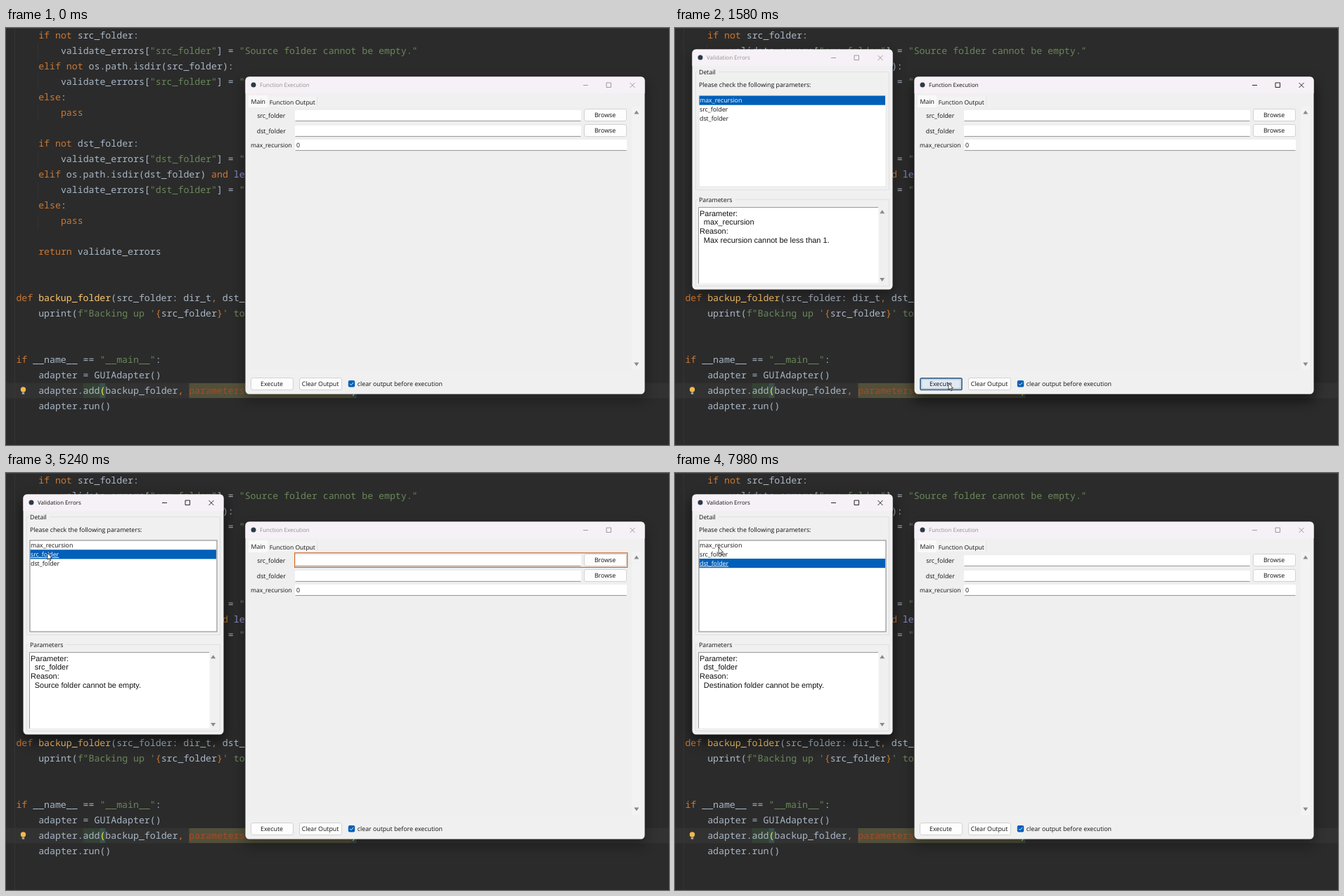
An HTML page that plays this animation: 943 by 594 pixels, repeating every 8000 ms.

```html
<!DOCTYPE html>
<html lang="en">
<head>
<meta charset="utf-8">
<title>Parameter validation</title>
<style>
  html, body { margin: 0; width: 100%; height: 100%; overflow: hidden; background: #2b2b2b; }
  svg { display: block; width: 943px; height: 594px; }
  text { white-space: pre; text-rendering: geometricPrecision; }
  .code { font: 13.23px "Noto Sans Mono", monospace; fill: #a9b7c6; }
  .kw { fill: #cc7832; }
  .str { fill: #6a8759; }
  .fn { fill: #ffc66d; }
  .arg { fill: #aa4926; }
  .builtin { fill: #8888c6; }
  .brace { fill: #ffef28; }
  .ui { font: 8.8px "Open Sans", "Noto Sans", sans-serif; fill: #111; }
  .cap { font: 8px "Open Sans", "Noto Sans", sans-serif; }
  .out { font: 10.95px "Liberation Sans", Arial, sans-serif; fill: #111; }
  .small { font-size: 8.55px; }
  .shadow { fill: #000; filter: blur(9px); opacity: .55; }
  .bar { fill: #111; color: #111; }
  .idle .bar { fill: #929292; color: #929292; }
  .idle .shadow { opacity: .3; }
</style>
</head>
<body>
<svg id="stage" viewBox="0 0 943 594" xmlns="http://www.w3.org/2000/svg"></svg>
<script>
const LOOP = 8000, CHAR = 7.94, ROW = 22, ITEM = 12.75;

const rect = (x, y, w, h, fill, more = '') =>
  `<rect x="${x}" y="${y}" width="${w}" height="${h}" fill="${fill}" ${more}/>`;
const label = (x, y, s, cls = 'ui', more = '') =>
  `<text x="${x}" y="${y}" class="${cls}" ${more}>${s}</text>`;
const line = (d, color, w = 1) =>
  `<path d="${d}" fill="none" stroke="${color}" stroke-width="${w}"/>`;
const mid = 'text-anchor="middle"';

// Editor: [row, column, text]
const code = [
  [0, 4, 'if not src_folder:'],
  [1, 8, 'validate_errors["src_folder"] = "Source folder cannot be empty."'],
  [2, 4, 'elif not os.path.isdir(src_folder):'],
  [3, 8, 'validate_errors["src_folder"] = "'],
  [4, 4, 'else:'],
  [5, 8, 'pass'],
  [7, 4, 'if not dst_folder:'],
  [8, 8, 'validate_errors["dst_folder"] = "'],
  [9, 4, 'elif os.path.isdir(dst_folder) and le'],
  [10, 8, 'validate_errors["dst_folder"] = "'],
  [11, 4, 'else:'],
  [12, 8, 'pass'],
  [14, 4, 'return validate_errors'],
  [17, 0, 'def backup_folder(src_folder: dir_t, dst_'],
  [18, 4, 'uprint(f"Backing up \'{src_folder}\' to'],
  [21, 0, 'if __name__ == "__main__":'],
  [22, 4, 'adapter = GUIAdapter()'],
  [23, 4, 'adapter.add(backup_folder, parameters'],
  [24, 4, 'adapter.run()']
];
const token = new RegExp([
  '(?<str>f?"[^"{]*"?|\' to)',
  '(?<kw>\\b(?:if|not|elif|else|pass|and|return|def)\\b|[,{}])',
  '(?<fn>(?<=def )\\w+)',
  '(?<arg>\\bparameters\\b)',
  '(?<builtin>\\ble$)',
  '(?<brace>(?<=add)\\()'
].join('|'), 'g');

function paint(s) {
  return s.replace(token, (m, ...rest) => {
    const groups = rest[rest.length - 1];
    const cls = Object.keys(groups).find(k => groups[k] !== undefined);
    return `<tspan class="${cls}">${m}</tspan>`;
  });
}

function editor() {
  let s = rect(0, 0, 943, 594, '#2b2b2b') + rect(0, 0, 943, 1, '#3a3a3a') +
    rect(0, 505.5, 943, 22, '#323232') + rect(12, 0, 1, 594, '#353535') +
    rect(109.5, 506, 24, 21, '#344134') + rect(133.4, 506, 8, 21, '#3b514d') +
    rect(260.5, 506, 231, 21, '#52503a') + rect(491, 506, 7.5, 21, '#3b514d') +
    label(490.6, 521.5, ')', 'code brace');
  for (const [row, col, text] of code) {
    if (col === 8) s += rect(45, row * ROW, 1, ROW, '#333');
    s += label((14.4 + col * CHAR).toFixed(2), 15.4 + row * ROW, paint(text), 'code');
  }
  return s + '<circle cx="24.5" cy="515" r="3.7" fill="#f2b84b"/>' +
    rect(22.8, 519.3, 3.4, 2.2, '#b9b9b9');
}

function frame(x, y, w, h, title) {
  const r = x + w, cy = y + 11;
  return `<rect class="shadow" x="${x - 2}" y="${y + 7}" width="${w + 4}" height="${h + 3}" rx="8"/>` +
    rect(x - .5, y - .5, w + 1, h + 1, '#f0f0f0', 'rx="5.5"') +
    `<path d="M${x - .5} ${y + 23}V${y + 5}q0-5.5 5.5-5.5H${r - 5}q5.5 0 5.5 5.5V${y + 23}z" fill="#f6f1f6"/>` +
    `<circle cx="${x + 11}" cy="${cy}" r="3.5" fill="#2c3a48"/>` +
    `<g class="bar">${label(x + 20, y + 14, title, 'cap')}` +
    line(`M${r - 87} ${cy + .5}h7M${r - 54} ${cy - 3}h6.5v6.5h-6.5zM${r - 20.5} ${cy - 3}l7 7m0-7l-7 7`, 'currentColor', .9) +
    '</g>';
}

const arrows = (x, y1, y2) =>
  `<path d="M${x - 3.5} ${y1 + 5}l3.5-5 3.5 5zM${x - 3.5} ${y2 - 5}l3.5 5 3.5-5z" fill="#8a8a8a"/>`;
const entry = (y, w) => rect(411, y, w, 16, '#fff', 'rx="1.5"') +
  line(`M411.5 ${y + 15.4}h${w - 1}`, '#868686', .9);
const button = (x, y, h, s) =>
  rect(x + .5, y + .5, 60, h, '#fdfdfd', 'rx="2.5" stroke="#d3d3d3"') +
  label(x + 30, y + h / 2 + 3.7, s, 'ui', mid);

function mainWindow() {
  let s = frame(341, 70, 567, 451, 'Function Execution') +
    rect(345, 112, 558, 375, '#efefef') + rect(890, 112, 13, 375, '#f3f3f3') +
    rect(345, 96, 27, 17, '#f9f9f9') + rect(372, 98, 70, 14, '#f3f3f3') +
    line('M442.5 98v14', '#e4e4e4') +
    label(348.5, 107.7, 'Main') + label(374.7, 109, 'Function Output', 'ui small') +
    arrows(896.8, 117.5, 481.5);
  names.slice(1).forEach((name, i) => {
    const y = 117 + i * 22;
    s += label(377.3, y + 10.8, name, 'ui', mid) + entry(y, 407) +
      button(822, y - 2, 17, 'Browse');
  });
  return s + label(377.3, 170.3, names[0], 'ui small', mid) +
    entry(159, 472) + label(413, 170.3, '0') +
    button(348, 498, 17, 'Execute') +
    '<g id="focus">' +
    rect(349, 498.8, 59, 16.6, '#e0eaf3', 'id="hover" rx="2" stroke="#41658e" stroke-width="1.7"') +
    rect(351, 500.8, 55, 12.6, 'none', 'stroke="#8b98a6" stroke-width=".7" stroke-dasharray="1 .8"') +
    label(378, 510.2, 'Execute', 'ui', mid) + '</g>' +
    button(417, 498, 17, 'Clear Output') +
    rect(486.8, 502, 9.4, 9.4, '#005fb8', 'rx="2"') +
    line('M489 506.8l1.8 1.8 3.4-3.6', '#fff', .9) +
    label(499.8, 510.2, 'clear output before execution') +
    rect(0, 0, 0, 0, 'none', 'id="mark" stroke="#cd6a2b" stroke-width="1.2"');
}

const names = ['max_recursion', 'src_folder', 'dst_folder'];
const reasons = [
  'Max recursion cannot be less than 1.',
  'Source folder cannot be empty.',
  'Destination folder cannot be empty.'
];
const marks = [[158.6, 16.8], [113.8, 20.6], [136.6, 20]];

function dialog() {
  return frame(25, 31, 284, 341, 'Validation Errors') +
    line('M62 62.5H304.5V230.5H29.5V62.5h3M85 244.5H304.5V367.5H29.5V244.5h3', '#e0e0e0') +
    label(34, 65.8, 'Detail') + label(34, 84.3, 'Please check the following parameters:') +
    label(34, 247.8, 'Parameters') +
    rect(34, 96, 266, 130, '#fff', 'id="list" stroke="#e6e6e6"') +
    rect(34.5, 96.5, 264.5, 13.2, '#005fb8', 'id="pick"') +
    names.map((n, i) => label(35, 106.2 + i * ITEM, n, 'ui item')).join('') +
    rect(33.5, 255.5, 256, 108, '#fff') + line('M33.5 364V255.5H289', '#9a9a9a') +
    arrows(294.7, 259.3, 361) +
    label(35, 267.6, 'Parameter:', 'out') + label(40.8, 280.3, '', 'out', 'id="param"') +
    label(35, 293, 'Reason:', 'out') + label(40.8, 305.7, '', 'out', 'id="reason"');
}

const $ = id => document.getElementById(id);
$('stage').innerHTML = editor() + `<g id="main">${mainWindow()}</g><g id="dialog">${dialog()}</g>` +
  '<path id="cursor" d="M0 0V9.4L2.1 7.5 3.5 10.8 5 10.2 3.6 7H6.5z" fill="#fff" stroke="#111" stroke-width=".75"/>';
const items = [...document.querySelectorAll('.item')];

// Pointer stops: time, x, y
const path = [
  [0, 331, 546], [70, 331, 546], [500, 386, 510], [830, 389, 506], [1780, 389, 506],
  [1990, 350, 485], [2060, 350, 485], [2600, 50, 102], [2890, 59, 107], [4560, 59, 107],
  [4830, 59, 114], [5960, 59, 114], [6170, 59, 123], [7300, 59, 123], [7650, 61, 107],
  [7979, 61, 107], [7980, 62, 106], [LOOP, 62, 106]
];
// Border flashes: start, end, row
const flashes = [
  [3360, 3490, 0], [3630, 3760, 0], [3890, 4030, 0],
  [4970, 5100, 1], [5240, 5370, 1], [5500, 5630, 1],
  [6240, 6370, 2], [6500, 6640, 2], [6770, 6970, 2]
];

function pointer(t) {
  const i = path.findIndex(p => p[0] > t);
  const [t0, x0, y0] = path[i - 1], [t1, x1, y1] = path[i];
  const u = (t - t0) / (t1 - t0), k = u * u * (3 - 2 * u);
  return [x0 + (x1 - x0) * k, y0 + (y1 - y0) * k];
}

const set = (id, attrs) => {
  for (const k in attrs) $(id).setAttribute(k, attrs[k]);
};
const show = (id, on) => { $(id).style.display = on ? '' : 'none'; };

function render(t) {
  const opening = t >= 1440 && t < 1580, picked = t >= 3220;
  const dialogActive = opening || picked;
  $('main').classList.toggle('idle', t < 760 || dialogActive);
  $('dialog').classList.toggle('idle', !dialogActive);

  show('focus', t >= 760 && !picked);
  set('hover', { fill: t >= 1160 && t < 1230 ? '#cfe3f5' : t < 1990 ? '#e0eaf3' : '#fdfdfd' });

  const open = Math.min(1, Math.max(0, (t - 1300) / 210));
  const scale = .93 + .07 * open;
  show('dialog', t >= 1370);
  set('dialog', {
    opacity: open,
    transform: `translate(167 201) scale(${scale}) translate(-167 -201)`
  });

  const row = t < 4900 ? 0 : t < 6240 ? 1 : 2;
  set('list', { stroke: picked ? '#808080' : '#e6e6e6' });
  set('pick', { y: 96.5 + row * ITEM });
  items.forEach((el, i) => {
    el.style.fill = i === row ? '#fff' : '#111';
    el.style.textDecoration = i === row && picked ? 'underline' : 'none';
  });
  $('param').textContent = names[row];
  $('reason').textContent = reasons[row];

  const flash = flashes.find(f => t >= f[0] && t < f[1]);
  show('mark', flash);
  if (flash) {
    const [y, height] = marks[flash[2]];
    set('mark', { x: 410.6, y, width: 473.2, height });
  }

  const [x, y] = pointer(t);
  show('cursor', t >= 70);
  set('cursor', { transform: `translate(${x.toFixed(1)} ${y.toFixed(1)})` });
}

function tick() {
  render(performance.now() % LOOP);
  requestAnimationFrame(tick);
}
tick();
</script>
</body>
</html>
```
